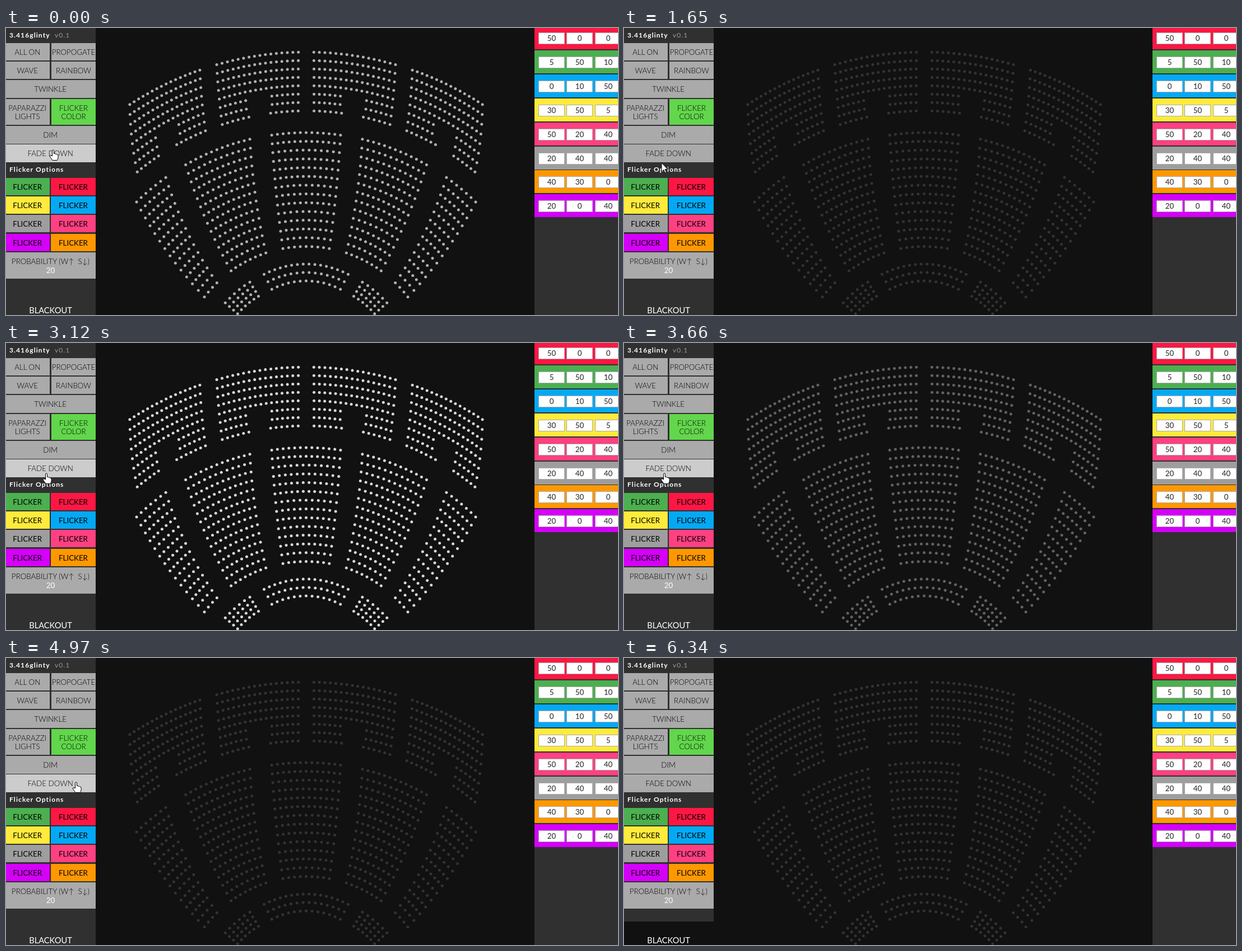
An HTML page for the animation above (7630 ms loop, 1092 by 513 pixels).

```html
<!DOCTYPE html>
<html lang="en">
<head>
<meta charset="utf-8">
<title>Seat lights</title>
<style>
html, body { margin: 0; width: 100%; height: 100%; overflow: hidden; background: #111; }
svg { display: block; width: 1092px; height: 513px; font: 13.33px Lato, sans-serif; }
rect { shape-rendering: crispEdges; }
text { white-space: pre; }
.mid { text-anchor: middle; }
.thin { font-weight: 300; }
.head { font-weight: 700; font-size: 12px; letter-spacing: 1.1px; }
.version { font-weight: 400; }
.big { font-size: 14.67px; }
</style>
</head>
<body>
<svg id="stage" viewBox="0 0 1092 513"></svg>
<script>
const LOOP = 7630, CX = 535.5, PANEL = '#303030';
const stage = document.getElementById('stage');
const colors = {
  green: '#4caf50', red: '#ff1744', yellow: '#ffeb3b', blue: '#03a9f4',
  grey: '#9e9e9e', pink: '#ff4081', purple: '#d500f9', orange: '#ff9800'
};

const rect = (x, y, w, h, fill, extra = '') =>
  `<rect x="${x}" y="${y}" width="${w}" height="${h}" fill="${fill}" ${extra}/>`;
const text = (x, y, s, fill = '#000', cls = 'mid') =>
  `<text x="${x}" y="${y}" class="${cls}" fill="${fill}">${s}</text>`;

// A button with centred lines, split at "|".
function button(x, y, w, h, label, fill = '#aaa', cls = 'mid thin', extra = '') {
  const lines = label.split('|');
  const first = y + h / 2 + 5 - (lines.length - 1) * 7.5;
  return rect(x, y, w, h, fill, extra) +
    lines.map((s, i) => text(x + w / 2 - (x ? 0 : .8), first + i * 15, s, '#000', cls)).join('');
}

function sidebar() {
  const pair = (y, h, a, b, fill) => button(0, y, 78, h, a) + button(81, y, 79, h, b, fill);
  const flicker = (fill, i) => button(i % 2 ? 80 : 0, Math.round(267.6 + (i >> 1) * 33.3),
    i % 2 ? 80 : 78, 31, 'FLICKER', fill, 'mid');
  return rect(0, 0, 160, 513, PANEL) +
    text(6, 16.5, '3.416glinty', '#fff', 'head') +
    text(87, 16.5, 'v0.1', '#999', 'head version') +
    pair(27, 31, 'ALL ON', 'PROPOGATE') +
    pair(60, 31, 'WAVE', 'RAINBOW') +
    button(0, 93, 160, 32, 'TWINKLE') +
    pair(127, 46, 'PAPARAZZI|LIGHTS', 'FLICKER|COLOR', '#62d64c') +
    button(0, 175, 160, 32, 'DIM') +
    button(0, 208, 160, 32, 'FADE DOWN', '#aaa', 'mid thin', 'id="fade"') +
    text(6, 257, 'Flicker Options', '#fff', 'head') +
    Object.values(colors).map(flicker).join('') +
    rect(0, 401, 160, 47, '#aaa') +
    text(79.5, 421.5, 'PROBABILITY (W↑&#160; S↓)', '#000', 'mid thin') +
    text(79.5, 438, '20', '#fff') +
    rect(0, 471, 160, 42, PANEL, 'id="blackout"') +
    text(79.5, 509.5, 'BLACKOUT', '#fff', 'mid big');
}

function palette() {
  const mixes = {
    red: [50, 0, 0], green: [5, 50, 10], blue: [0, 10, 50], yellow: [30, 50, 5],
    pink: [50, 20, 40], grey: [20, 40, 40], orange: [40, 30, 0], purple: [20, 0, 40]
  };
  const row = ([name, values], i) => {
    const y = Math.round(42.9 * i);
    return rect(943, y - 3, 149, 41, colors[name]) + values.map((v, k) => {
      const x = Math.round(950 + 50.4 * k);
      return rect(x + .5, y + 8.5, 46, 20, '#fff', 'stroke="#aaa"') +
        text(x + 23.5, y + 23, v, '#222');
    }).join('');
  };
  return rect(943, 0, 149, 513, PANEL) + Object.entries(mixes).map(row).join('');
}

const mix = (a, b, t) => a + (b - a) * t;

// Seats sit on arcs around (CX, cy). Each block lies between two aisle angles,
// given for its back row and its front row, and is mirrored unless it spans the axis.
function block(tier, back, front = back) {
  const { cy = 618, radius, step, rows, pitch = 10.5, booth = () => false } = tier;
  let out = '';
  for (let r = 0; r < rows; r++) {
    const t = r / (rows - 1), R = radius - step * r;
    const from = mix(back[0], front[0], t), to = mix(back[1], front[1], t);
    const gaps = Math.round((to - from) * R / pitch);
    for (let i = 0; i <= gaps; i++) {
      const angle = mix(from, to, i / gaps);
      const dx = R * Math.sin(angle), y = cy - R * Math.cos(angle);
      if (booth(r, dx)) continue;
      for (const side of back[0] < 0 ? [1] : [1, -1])
        out += `<circle cx="${(CX + side * dx).toFixed(1)}" cy="${y.toFixed(1)}" r="2.5"/>`;
    }
  }
  return out;
}

const between = (v, a, b) => v > a && v < b;
const rear = {
  radius: 575, step: 15, rows: 8, pitch: 9.6,
  booth: (row, dx) => row > 4 && (between(dx, 68, 101) || between(dx, 232, 262))
};
const middle = { radius: 431, step: 15.65, rows: 14 };
const pit = { cy: 585, radius: 163, step: 15, rows: 3 };
const corner = { radius: 192, step: 9.8, rows: 4 };

const seats =
  block(rear, [.024, .281], [.03, .324]) +
  block(rear, [.336, .579], [.392, .696]) +
  block(middle, [-.143, .143], [-.183, .183]) +
  block(middle, [.235, .522], [.321, .629]) +
  block(middle, [.62, .778], [.775, .923]) +
  block(pit, [-.478, .478]) +
  block(corner, [.55, .85]);

const HAND = 'M-1.5 11V1.5a1.5 1.5 0 0 1 3 0V6.5q2-.8 2.7.8 2-.6 2.6.9 2.3-.4 2.3 1.8V13' +
  'q0 3-2 5.5H-1Q-3 15.5-5.5 12.2-6.3 9.5-4 9.6z';
const ARROW = 'M0 0V16l3.7-3.6 2.5 5.6 2.4-1-2.5-5.4H11z';

stage.innerHTML = sidebar() + palette() + `<g id="seats">${seats}</g>` +
  '<path id="cursor" fill="#fff" stroke="#000"/>';
const [fade, blackout, lights, cursor] =
  ['fade', 'blackout', 'seats', 'cursor'].map(id => document.getElementById(id));

// Each click lights the seats, which then dim by a fixed ratio at every tick.
const clicks = [-133, 3120, 5030];
function brightness(t) {
  const ticks = Math.floor((t - clicks.findLast(c => c <= t)) / 133);
  return Math.max(51, Math.round(216 * .82 ** ticks));
}

// Pointer glides: start, end, x, y; it rests in between.
const glides = [
  [1440, 1650, 67, 241], [1710, 2120, 72, 233], [3660, 4380, 116, 217],
  [4530, 4970, 125, 222], [5030, 5590, 78, 486], [6270, 6340, 106, 530]
];
function pointer(t) {
  let x = 84, y = 218;
  for (const [start, end, toX, toY] of glides) {
    const u = Math.min(1, Math.max(0, (t - start) / (end - start)));
    x = mix(x, toX, u);
    y = mix(y, toY, u);
  }
  return [x, y];
}

function draw(t) {
  const v = brightness(t), [x, y] = pointer(t);
  const onGap = between(y, 240, 268) || between(y, 448, 471);
  lights.setAttribute('fill', `rgb(${v},${v},${v})`);
  cursor.setAttribute('d', onGap ? ARROW : HAND);
  cursor.setAttribute('transform', `translate(${x.toFixed(1)} ${y.toFixed(1)})`);
  fade.setAttribute('fill', between(y, 208, 240) ? '#ccc' : '#aaa');
  blackout.setAttribute('fill', y > 471 ? '#111' : PANEL);
}

const start = performance.now();
function tick() {
  draw((performance.now() - start) % LOOP);
  requestAnimationFrame(tick);
}
tick();
</script>
</body>
</html>
```
